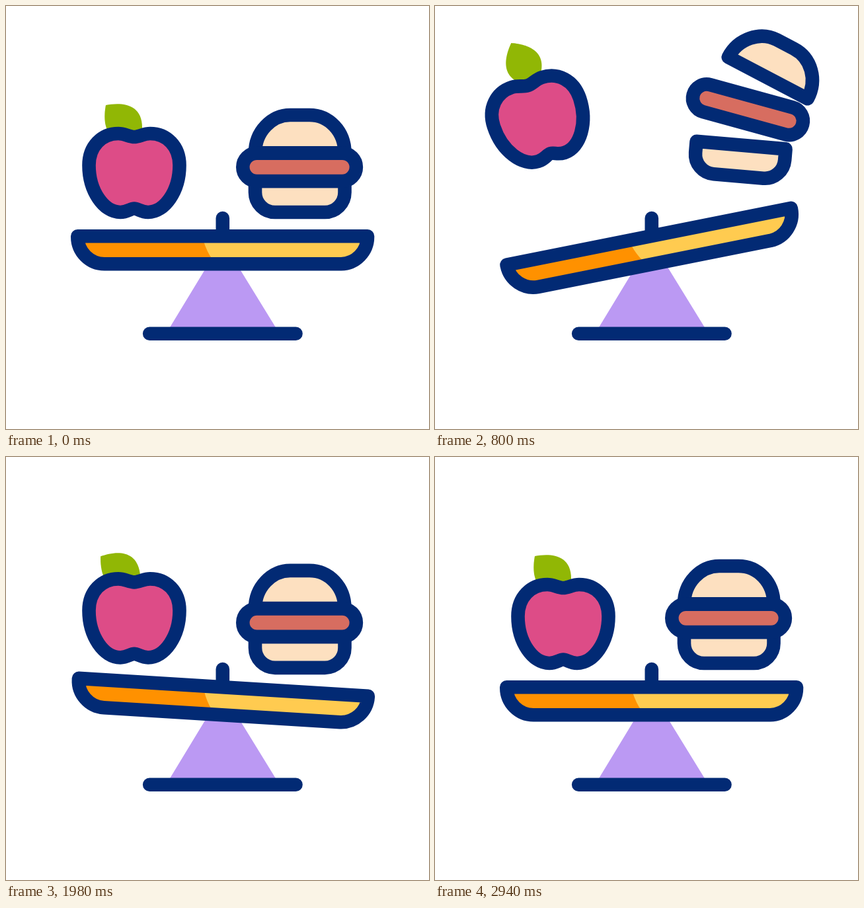
An HTML page with a canvas that plays this animation: 640 by 640 pixels, repeating every 3.1 s.

```html
<!DOCTYPE html>
<html lang="en">
<head>
<meta charset="utf-8">
<title>Balanced diet</title>
<style>
html, body { margin: 0; width: 100%; height: 100%; overflow: hidden; background: #fff; }
canvas { display: block; width: 640px; height: 640px; }
</style>
</head>
<body>
<canvas id="stage" width="640" height="640"></canvas>
<script>
const ctx = document.getElementById('stage').getContext('2d');
const LOOP = 3100, END = 2940;
const NAVY = '#022a74', BREAD = '#fde0c0';

const shapes = {
  stand: new Path2D('M242 496 L318.5 370 H336.5 L414 496 Z'),
  tray: new Path2D('M108.3 348.3 H547 V349.5 A41 41 0 0 1 507 390.3 H149 A41 41 0 0 1 108.3 349.5 Z'),
  trayRight: new Path2D('M299 356 Q303.5 371 312.5 384 H507 A41 41 0 0 0 547 350 V348 H296 Z'),
  apple: new Path2D('M194 198 C186 198 180 193 170 193 C145 193 125.5 212 125.5 241 ' +
    'C125.5 280 148 312 173 312 C184 312 188 306.5 194 306.5 C200 306.5 204 312 215 312 ' +
    'C240 312 262.5 280 262.5 241 C262.5 212 243 193 218 193 C208 193 202 198 194 198 Z'),
  leaf: new Path2D('M151 150 C172 146 206 146 206 184 V205 H185 C147 205 147 171 151 150 Z'),
  top: new Path2D('M377 222.3 C377 190 402 165 430 165 H459 C489 165 512.5 190 512.5 222.3 Z'),
  patty: new Path2D('M379.5 222.6 H508.7 A21.2 21.2 0 0 1 508.7 265 H379.5 A21.2 21.2 0 0 1 379.5 222.6 Z'),
  bottom: new Path2D('M377 265 H512.5 V282 A30 30 0 0 1 482.5 312 H407 A30 30 0 0 1 377 282 Z')
};

// x, y, turn: offset at the top of the jump; bend: sideways bow on the way;
// drift: slow slide in the air; bob: sway after landing
const apple  = { px: 194, py: 252, x: -36.7, y: -80.5, turn: -18.3, bend: -1.5, drift: -12, bob: -10.9, lead: 10 };
const bottom = { px: 444.7, py: 288.5, x: 16.5, y: -54.5, turn: 4.9, bend: -8, drift: 15.7, bob: 8.6, lead: 0 };
const top_   = { px: 444.7, py: 222.3, x: 59.3, y: -113.5, turn: 27.7, bend: -1, drift: 20, bob: 8.6, lead: 0 };
const patty  = { px: 444.1, py: 243.8, x: 29.5, y: -87, turn: 15.4, bend: -4.4, drift: 14, bob: 8.6, lead: 0 };

const clamp = v => Math.min(1, Math.max(0, v));
const span = (t, from, to) => clamp((t - from) / (to - from));
const sine = u => (1 - Math.cos(Math.PI * u)) / 2;
const quint = u => u < 0.5 ? 16 * u ** 5 : 1 - 16 * (1 - u) ** 5;

const lift = t => quint(span(t, 120, 943)) * (1 - sine(span(t, 1640, 1930)));
const glide = t => sine(span(t, 1080, 1640));
const growth = t => 1 + 0.05 * glide(t);

// Damped swing that dies out at END
function swing(t, from) {
  if (t < from || t > END) return 0;
  return Math.sin(Math.PI * (t - from) / 460) * (END - t) / (END - from);
}
const bounce = t => swing(t, 1800);

function place(px, py, x, y, angle, draw) {
  ctx.save();
  ctx.translate(px + x, py + y);
  ctx.rotate(angle * Math.PI / 180);
  ctx.translate(-px, -py);
  draw();
  ctx.restore();
}

function toss(item, t, draw) {
  const p = lift(t + item.lead), g = growth(t);
  const x = (item.x + item.drift * glide(t)) * p * p + item.bend * 4 * p * (1 - p);
  const y = item.y * g * (1 - (1 - p) ** 1.5) + item.bob * bounce(t);
  place(item.px, item.py, x, y, item.turn * g * p, draw);
}

function fill(shape, color) {
  ctx.fillStyle = color;
  ctx.fill(shape);
}

function outlined(shape, color) {
  fill(shape, color);
  ctx.strokeStyle = NAVY;
  ctx.stroke(shape);
}

function line(x0, y0, x1, y1, color) {
  ctx.strokeStyle = color;
  ctx.beginPath();
  ctx.moveTo(x0, y0);
  ctx.lineTo(x1, y1);
  ctx.stroke();
}

function drawSparks(t) {
  for (let i = 0; i < 3; i++) {
    const s = t - i * 40;
    const outer = 95 - 50 * (1 - span(s, 2105, 2390)) ** 2;
    const inner = 45 + 50 * span(s, 2190, 2365) ** 2;
    if (outer <= inner) continue;
    const dx = Math.sin(i * Math.PI / 4), dy = Math.cos(i * Math.PI / 4);
    for (const side of [-1, 1]) {
      const cx = 315 + side * 189.5;
      line(cx + side * dx * inner, 162 - dy * inner,
           cx + side * dx * outer, 162 - dy * outer, '#66ccd1');
    }
  }
}

function drawTray(t) {
  const tilt = -11.3 * growth(t) * lift(t) ** 1.4 + 4.9 * swing(t, 1840);
  place(328, 369, 0, 0, tilt, () => {
    fill(shapes.tray, '#ff9100');
    fill(shapes.trayRight, '#ffcb50');
    ctx.strokeStyle = NAVY;
    ctx.stroke(shapes.tray);
  });
}

function drawApple(t) {
  const leafTurn = 33 * growth(t) * lift(t) - 11 * bounce(t);
  toss(apple, t, () => {
    place(206, 206, 0, 0, leafTurn, () => fill(shapes.leaf, '#91b705'));
    outlined(shapes.apple, '#dd4c87');
  });
}

function draw(t) {
  ctx.fillStyle = '#fff';
  ctx.fillRect(0, 0, 640, 640);
  ctx.lineWidth = 20.6;
  ctx.lineCap = ctx.lineJoin = 'round';

  drawSparks(t);
  fill(shapes.stand, '#bb99f3');
  line(217.2, 495.8, 438.5, 495.8, NAVY);
  line(327.8, 321, 327.8, 346, NAVY);
  drawTray(t);
  drawApple(t);
  toss(bottom, t, () => outlined(shapes.bottom, BREAD));
  toss(top_, t, () => outlined(shapes.top, BREAD));
  toss(patty, t, () => outlined(shapes.patty, '#d76d60'));
}

const start = performance.now();
function tick() {
  draw((performance.now() - start) % LOOP);
  requestAnimationFrame(tick);
}
tick();
</script>
</body>
</html>
```
